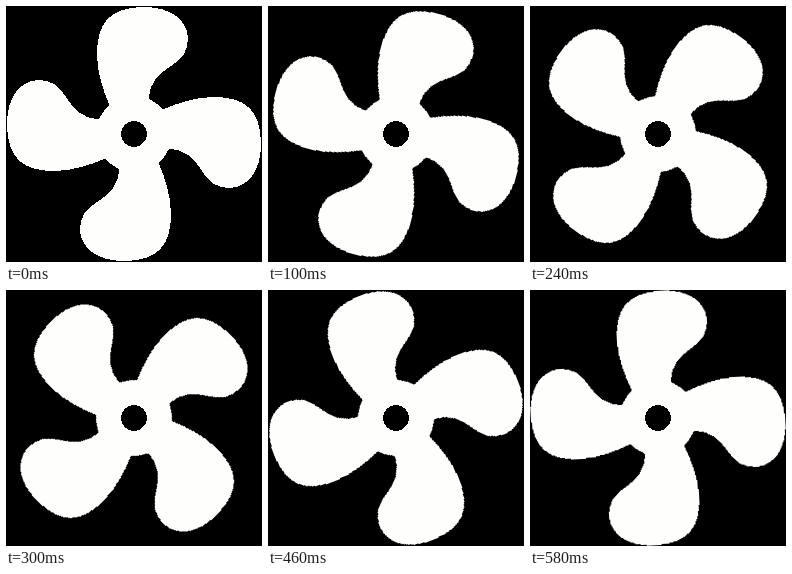
Animation of 256 by 256 pixels, one loop 600 ms. Source, as an HTML page:

```html
<!DOCTYPE html>
<html lang="en">
<head>
<meta charset="utf-8">
<title>Fan</title>
<style>
  html, body { margin: 0; width: 100%; height: 100%; overflow: hidden; background: #000; }
  svg { display: block; width: 100%; height: 100%; shape-rendering: crispEdges; }
  .fan { fill: #fefffd; animation: spin 600ms steps(30, end) infinite; }
  /* Four equal blades: a quarter turn closes the loop */
  @keyframes spin { to { transform: rotate(90deg); } }
</style>
</head>
<body>
<svg viewBox="-128 -128 256 256">
  <defs>
    <path id="blade" d="M0 0L-25-30C-31-44-37-62-37-80C-37-110-25-127 10-127C38-127 54-113 54-95C54-82 47-74 37-68C24-60.2 15.5-51 14.5-35Z"/>
  </defs>
  <g class="fan">
    <use href="#blade"/>
    <use href="#blade" transform="rotate(90)"/>
    <use href="#blade" transform="rotate(180)"/>
    <use href="#blade" transform="rotate(270)"/>
    <circle r="38"/>
  </g>
  <circle r="12.8"/>
</svg>
</body>
</html>
```
